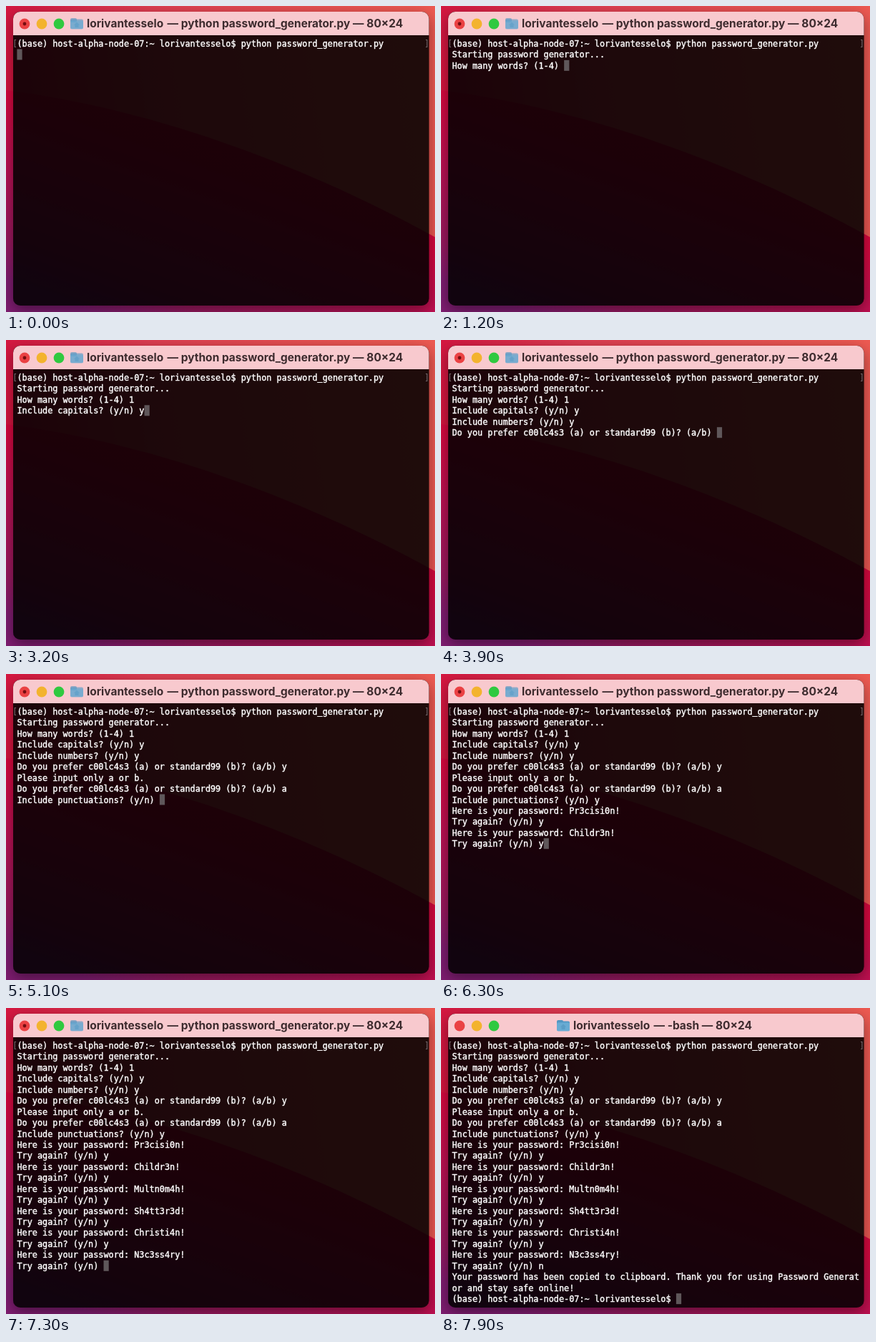
Recreate the animation shown at these times as an HTML page with a canvas. Size 600 by 429 pixels, loop 8000 ms.

```html
<!DOCTYPE html>
<html lang="en">
<head>
<meta charset="utf-8">
<title>Password generator</title>
<style>
html, body { margin: 0; width: 100%; height: 100%; overflow: hidden; background: #c9204a; }
canvas { display: block; width: 100vw; height: 100vh; }
</style>
</head>
<body>
<canvas id="stage" width="600" height="429"></canvas>
<script>
const ctx = document.getElementById('stage').getContext('2d');
const LOOP = 8000, EXIT = 7700;
const USER = 'lorivantesselo', HOST = 'host-alpha-node-07';
const PROMPT = `(base) ${HOST}:~ ${USER}$ `;
const LEFT = 15.4, CELL = 7.125, PITCH = 15.44;
const MONO = '11.83px "DejaVu Sans Mono", monospace';
const TITLE = '700 15.5px Inter, sans-serif';
const WINDOW = [10, 8, 581.5, 412, 10];

const again = word => `\nHere is your password: ${word}\nTry again? (y/n) `;
const style = 'Do you prefer c00lc4s3 (a) or standard99 (b)? (a/b) ';

// Each entry appends its text to the terminal at the given time.
const session = [
  [0, PROMPT + 'python password_generator.py\n'],
  [1200, 'Starting password generator...\nHow many words? (1-4) '],
  [2700, '1'],
  [2900, '\nInclude capitals? (y/n) '],
  [3100, 'y'],
  [3300, '\nInclude numbers? (y/n) '],
  [3500, 'y'],
  [3700, '\n' + style],
  [4100, 'y'],
  [4300, '\nPlease input only a or b.\n' + style],
  [4600, 'a'],
  [4800, '\nInclude punctuations? (y/n) '],
  [5200, 'y'],
  [5400, again('Pr3cisi0n!')],
  [5800, 'y'],
  [6000, again('Childr3n!')],
  [6200, 'y'],
  [6400, again('Multn0m4h!')],
  [6700, 'y'],
  [6800, again('Sh4tt3r3d!')],
  [6900, 'y'],
  [7000, again('Christi4n!')],
  [7100, 'y'],
  [7200, again('N3c3ss4ry!')],
  [7600, 'n'],
  [EXIT, '\nYour password has been copied to clipboard. Thank you for using Password Generat'
    + '\nor and stay safe online!\n' + PROMPT]
];

function blend(gradient, stops) {
  stops.forEach(([at, color]) => gradient.addColorStop(at, color));
  return gradient;
}

function rounded(x, y, w, h, radii, color) {
  ctx.fillStyle = color;
  ctx.beginPath();
  ctx.roundRect(x, y, w, h, radii);
  ctx.fill();
}

function disc(x, y, r, color) {
  ctx.fillStyle = color;
  ctx.beginPath();
  ctx.arc(x, y, r, 0, Math.PI * 2);
  ctx.fill();
}

function drawWallpaper() {
  ctx.fillStyle = blend(ctx.createLinearGradient(0, 90, 600, 0), [
    [0, '#d4143f'], [0.35, '#df3e52'], [0.7, '#e75052'], [1, '#ee5a52']
  ]);
  ctx.fillRect(0, 0, 600, 429);
  ctx.fillStyle = blend(ctx.createLinearGradient(380, 150, 260, 480), [
    [0, '#d9083e'], [0.3, '#d6083f'], [0.55, '#bc1052'], [0.85, '#98185e'], [1, '#7e1c70']
  ]);
  ctx.beginPath();
  ctx.moveTo(0, 118);
  ctx.bezierCurveTo(190, 142, 400, 214, 600, 324);
  ctx.lineTo(600, 429);
  ctx.lineTo(0, 429);
  ctx.fill();
}

// The shadow is clipped to the outside so the translucent window stays clean.
function drawShadow() {
  ctx.save();
  ctx.beginPath();
  ctx.rect(0, 0, 600, 429);
  ctx.roundRect(...WINDOW);
  ctx.clip('evenodd');
  ctx.shadowColor = 'rgba(0,0,0,0.42)';
  ctx.shadowBlur = 20;
  ctx.shadowOffsetY = 6;
  rounded(...WINDOW, '#000');
  ctx.restore();
}

function drawWindow() {
  drawShadow();
  rounded(...WINDOW, 'rgba(0,0,0,0.865)');
  rounded(10, 8, 581.5, 33, [10, 10, 0, 0], '#f8c9ce');
}

function drawFolder(x, alpha) {
  ctx.globalAlpha = alpha;
  rounded(x, 17, 9, 6, 2, '#4f94bf');
  rounded(x, 18.5, 18, 13.5, 2, '#5298c4');
  rounded(x, 20.5, 18, 12, 2, '#68abd3');
  ctx.fillStyle = '#5a9dc6';
  ctx.beginPath();
  ctx.moveTo(x + 9, 22.5);
  ctx.lineTo(x + 13, 26.5);
  ctx.lineTo(x + 11.5, 26.5);
  ctx.lineTo(x + 11.5, 30);
  ctx.lineTo(x + 6.5, 30);
  ctx.lineTo(x + 6.5, 26.5);
  ctx.lineTo(x + 5, 26.5);
  ctx.fill();
  ctx.globalAlpha = 1;
}

function drawTitleBar(running) {
  disc(26, 25, 7.4, '#ea4143');
  disc(50, 25, 7.4, '#f3b32e');
  disc(74, 25, 7.4, '#2fc940');
  if (running) disc(26, 25, 2.4, '#760d10');
  const x = running ? 113 : 185;
  drawFolder(x - 23, running ? 0.6 : 1);
  ctx.font = TITLE;
  ctx.fillStyle = '#3d2b2e';
  ctx.fillText(USER, x, 30);
  const command = running ? 'python password_generator.py' : '-bash';
  ctx.fillText(`— ${command} — 80×24`, x + 112.5, 30);
}

function drawTerminal(time) {
  const lines = session.filter(([at]) => at <= time).map(([, text]) => text).join('').split('\n');
  const last = lines.length - 1;
  ctx.fillStyle = '#5f575a';
  ctx.fillRect(LEFT + lines[last].length * CELL, 45 + last * PITCH, 7.2, 15);
  ctx.font = MONO;
  ctx.fillStyle = '#7a6e71';
  ctx.fillText('[', 9, 57);
  ctx.fillText(']', 585, 57);
  ctx.fillStyle = ctx.strokeStyle = '#fff';
  ctx.lineWidth = 0.4;
  lines.forEach((line, row) => {
    const y = 57 + row * PITCH;
    ctx.fillText(line, LEFT, y);
    ctx.strokeText(line, LEFT, y);
  });
}

const start = performance.now();

function frame() {
  const time = (performance.now() - start) % LOOP;
  drawWallpaper();
  drawWindow();
  drawTitleBar(time < EXIT);
  drawTerminal(time);
  requestAnimationFrame(frame);
}

frame();
</script>
</body>
</html>
```
